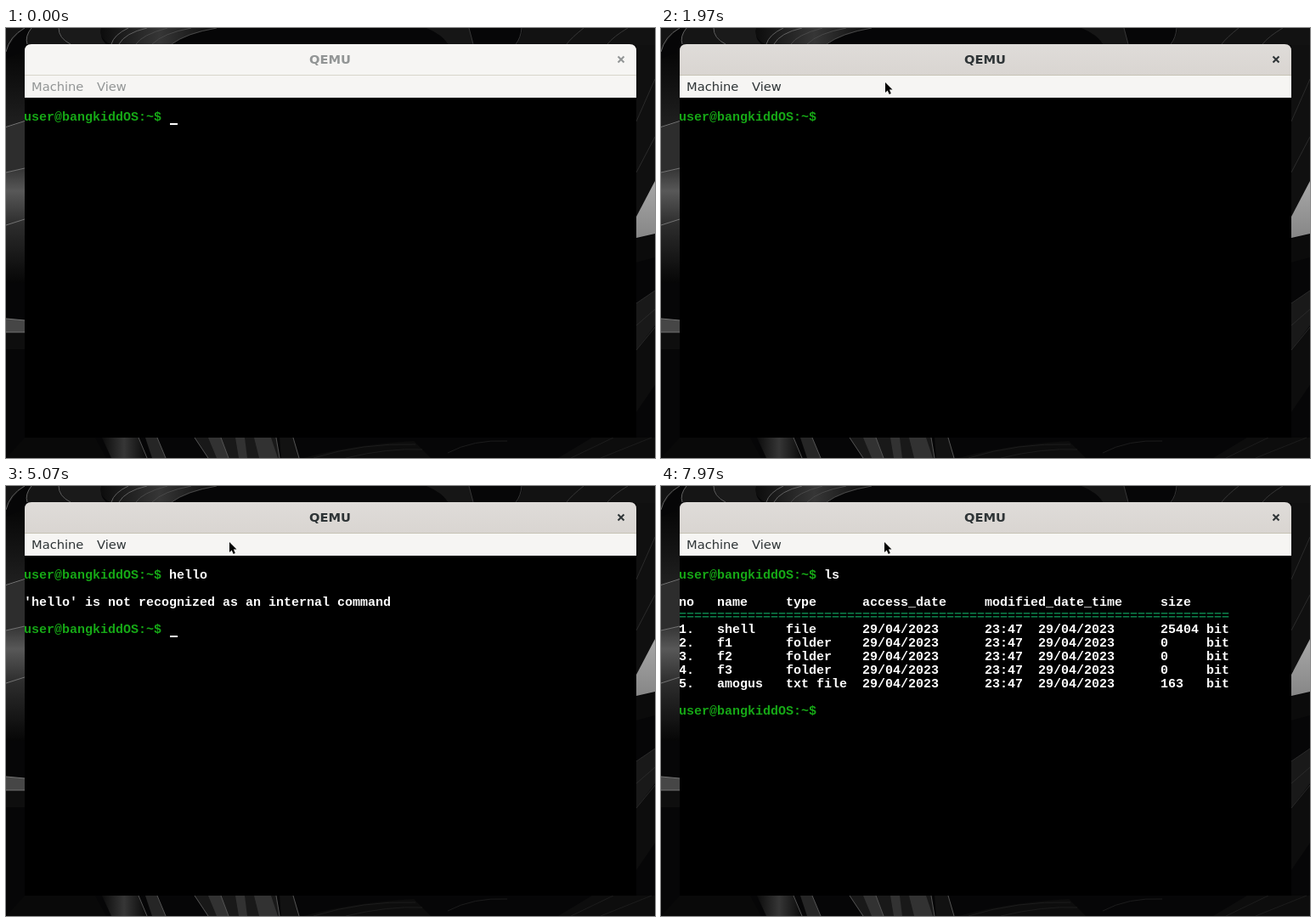
Animation of 764x506 px, one loop 8 s. Source, as an HTML page:

```html
<!DOCTYPE html>
<html lang="en">
<head>
<meta charset="utf-8">
<title>Terminal session</title>
<style>
  html, body { margin: 0; width: 100%; height: 100%; overflow: hidden; background: #000; }
  svg, pre, #caret { position: absolute; left: 0; top: 0; }
  svg text { font: 14.67px "DejaVu Sans", sans-serif; }
  svg .title { font-weight: bold; }
  pre {
    left: 21px; top: 82px; width: 721px; height: 400px; margin: 0;
    clip-path: inset(0 0 0 1px); overflow: hidden;
    background: #000; color: #fff;
    font: bold 15px/16px "Liberation Mono", monospace;
  }
  pre b { color: #16a816; }
  pre i { color: #0c7c48; font-style: normal; }
  #caret { width: 9px; height: 2px; background: #fff; }
</style>
</head>
<body>
<svg width="764" height="506">
  <defs>
    <linearGradient id="fade" x2="0" y2="1">
      <stop stop-color="#303030"/><stop offset="1" stop-color="#060606"/>
    </linearGradient>
    <linearGradient id="rise" x2="0" y2="1">
      <stop stop-color="#060606"/><stop offset="1" stop-color="#202020"/>
    </linearGradient>
    <linearGradient id="fold">
      <stop stop-color="#0c0c0c"/><stop offset=".5" stop-color="#363636"/><stop offset="1" stop-color="#0a0a0a"/>
    </linearGradient>
    <linearGradient id="sheen" x2="0" y2="1">
      <stop stop-color="#343434"/><stop offset=".4" stop-color="#585858"/><stop offset="1" stop-color="#2c2c2c"/>
    </linearGradient>
    <linearGradient id="glow" x2="0" y2="1">
      <stop stop-color="#a8a8a8"/><stop offset="1" stop-color="#868686"/>
    </linearGradient>
    <linearGradient id="header" x2="0" y2="1">
      <stop stop-color="#dfdcd9"/><stop offset="1" stop-color="#d9d5d1"/>
    </linearGradient>
  </defs>

  <g id="wallpaper">
    <rect width="764" height="506" fill="#060607"/>
    <!-- top edge -->
    <path d="M0 0H22Q8 10 0 28Z" fill="#141414"/>
    <path d="M30 0H62Q64 12 76 19H24Q22 8 30 0Z" fill="#151515"/>
    <path d="M62 0H115Q108 10 118 19H76Q64 12 62 0Z" fill="#1a1a1a"/>
    <path d="M112 0H250Q215 6 195 19H122Q108 10 112 0Z" fill="url(#fold)"/>
    <path d="M495 0H545L550 19H520Q514 8 495 0Z" fill="#161616"/>
    <path d="M608 0H764V20H600Q608 10 608 0Z" fill="#121212"/>
    <g fill="none" stroke="#606060">
      <path d="M22 0Q4 10 0 28M30 0Q22 10 25 19M62 0Q62 12 76 19M144 0Q127 8 124 19M166 0Q140 6 133 19"/>
      <path d="M190 0Q160 8 153 19M218 0Q185 6 172 19M248 0Q212 6 195 19" stroke="#484848"/>
      <path d="M545 0L550 19M607 0Q606 12 600 19M680 0Q665 12 660 19M732 0Q715 10 708 19" stroke="#363636"/>
    </g>
    <!-- left edge -->
    <path d="M0 36L22 28V110L0 117Z" fill="url(#rise)"/>
    <path d="M0 117L22 110V165L0 170Z" fill="#2d2d2d"/>
    <path d="M0 170L22 165V225L0 232Z" fill="url(#sheen)"/>
    <path d="M0 232L22 225V300H0Z" fill="url(#fade)"/>
    <path d="M0 342L22 344V358H0Z" fill="#464646"/>
    <path d="M0 359H22V378H0Z" fill="#0e0e0e"/>
    <path d="M0 116.500L22 109.500M0 170L22 165M0 232L22 225M0 342L22 344M0 358H22" fill="none" stroke="#747474"/>
    <!-- right edge -->
    <path d="M742 20H764V180L742 222Z" fill="#101010"/>
    <path d="M764 180L742 222V247L764 242Z" fill="url(#glow)"/>
    <path d="M742 248L764 243V270L742 276Z" fill="#0b0b0b"/>
    <path d="M742 324L764 309V350L742 379Z" fill="#191919"/>
    <path d="M742 379L764 352V420L742 452Z" fill="#0d0d0d"/>
    <path d="M742 110L764 60M742 170L764 128M742 324L764 309M742 350L764 331M742 379L764 352" fill="none" stroke="#2a2a2a"/>
    <!-- bottom edge -->
    <path d="M0 506L22 482H105L118 506Z" fill="#090909"/>
    <path d="M113 482H156L165 506H124Z" fill="url(#fold)"/>
    <path d="M164 482H178L188 506H172Z" fill="#262626"/>
    <path d="M222 482H318L322 506H238Z" fill="#191919"/>
    <path d="M238 482H253L262 506H248ZM270 482H281L284 506H274ZM292 482H312L320 506H298Z" fill="#323232"/>
    <path d="M322 482H338L345 506H324Z" fill="#121212"/>
    <path d="M350 506Q410 490 480 486L500 506ZM650 506L690 482H764V506Z" fill="#0d0d0d"/>
    <path d="M156 482L166 506M178 482L188 506M222 482L238 506M253 482L262 506M318 482L322 506M338 482L345 506" fill="none" stroke="#545454"/>
    <path d="M362 506Q420 488 482 490M400 506Q450 494 490 496M520 500Q550 484 590 486M665 506L715 482M700 506L760 482" fill="none" stroke="#1c1c1c"/>
  </g>

  <path id="titlebar" d="M22 56V27Q22 19 30 19H734Q742 19 742 27V56Z"/>
  <rect x="22" y="55" width="720" height="27" fill="#f6f5f3"/>
  <path id="divider" d="M22 55.500H742"/>
  <g id="labels">
    <text class="title" x="381.500" y="42" text-anchor="middle">QEMU</text>
    <text x="30" y="74">Machine</text>
    <text x="107" y="74">View</text>
  </g>
  <path id="close" d="M720.500 33.500L727.500 40.500M727.500 33.500L720.500 40.500" stroke-width="2"/>
</svg>

<pre id="screen"></pre>
<div id="caret"></div>

<svg width="764" height="506">
  <path id="bigArrow" d="M.5 .5V22L5.500 17.500L9 26L13 24.500L9.500 16.500H17Z" fill="#fff" stroke="#222"/>
  <path id="smallArrow" d="M0 0V12L2.700 9.500L4.700 14L6.800 13L4.900 8.600H8.500Z" fill="#000"/>
</svg>

<script>
const LOOP = 8000, FOCUS_AT = 1900;
const BLINK = 457, BLINK_START = 293;
const prompt = '<b>user@bangkiddOS:~$</b> ';
const $ = id => document.getElementById(id);

const files = [
  ['shell', 'file', 25404],
  ['f1', 'folder', 0],
  ['f2', 'folder', 0],
  ['f3', 'folder', 0],
  ['amogus', 'txt file', 163],
];
const tableRow = (no, name, type, access, modified, size, unit = '') =>
  no.padEnd(5) + name.padEnd(9) + type.padEnd(10) + access.padEnd(16) +
  modified.padEnd(23) + String(size).padEnd(6) + unit;
const date = '29/04/2023';
const listing = [
  tableRow('no', 'name', 'type', 'access_date', 'modified_date_time', 'size'),
  `<i>${'='.repeat(72)}</i>`,
  ...files.map(([name, type, size], i) =>
    tableRow(`${i + 1}.`, name, type, date, `23:47  ${date}`, size, 'bit')),
].join('\n');

// Each stage: what is already printed, then a command typed key by key.
const answered = (command, output) => `\n${prompt}${command}\n\n${output}\n\n`;
const stages = [
  { from: 0, above: '\n', command: 'hello', start: 2520, step: 150 },
  { from: 3750, above: answered('hello', "'hello' is not recognized as an internal command"),
    command: 'clear', start: 5400, step: 150 },
  { from: 6450, above: '\n', command: 'ls', start: 7050, step: 180 },
  { from: 7650, above: answered('ls', listing), command: '', start: LOOP, step: 1 },
];

// time, x, y
const pointerPath = [
  [1570, 130, -28], [1670, 161, 5], [1880, 264, 64], [2000, 264, 64], [2100, 263, 66],
];
function pointerAt(t) {
  const next = pointerPath.findIndex(p => p[0] > t);
  if (next === 0) return pointerPath[0].slice(1);
  if (next < 0) return pointerPath.at(-1).slice(1);
  const [a, b] = [pointerPath[next - 1], pointerPath[next]];
  const k = (t - a[0]) / (b[0] - a[0]);
  return [1, 2].map(i => a[i] + (b[i] - a[i]) * k);
}

function drawWindow(focused) {
  const ink = focused ? '#2e3436' : '#929595';
  $('titlebar').setAttribute('fill', focused ? 'url(#header)' : '#f6f5f3');
  $('divider').setAttribute('stroke', focused ? '#c6c2b4' : '#d8d5cb');
  $('labels').setAttribute('fill', ink);
  $('close').setAttribute('stroke', ink);
}

let shown = '';
function drawTerminal(t) {
  const stage = stages.findLast(s => t >= s.from);
  const count = Math.max(0, Math.floor((t - stage.start) / stage.step) + 1);
  const typed = stage.command.slice(0, count);
  const text = stage.above + prompt + typed;
  if (text !== shown) $('screen').innerHTML = shown = text;

  const row = stage.above.split('\n').length - 1;
  const column = 19 + typed.length;
  const phase = (t - BLINK_START + BLINK) % BLINK;
  $('caret').style.transform = `translate(${22 + column * 9}px, ${82 + row * 16 + 14}px)`;
  $('caret').style.visibility = phase < BLINK / 2 ? 'visible' : 'hidden';
}

function drawPointer(t) {
  const [x, y] = pointerAt(t);
  const inside = y >= 19;
  for (const [id, visible] of [['bigArrow', !inside], ['smallArrow', inside]]) {
    $(id).setAttribute('transform', `translate(${Math.round(x)} ${Math.round(y)})`);
    $(id).setAttribute('visibility', visible ? 'visible' : 'hidden');
  }
}

const began = performance.now();
function frame() {
  const t = (performance.now() - began) % LOOP;
  drawWindow(t >= FOCUS_AT);
  drawTerminal(t);
  drawPointer(t);
  requestAnimationFrame(frame);
}
frame();
</script>
</body>
</html>
```
